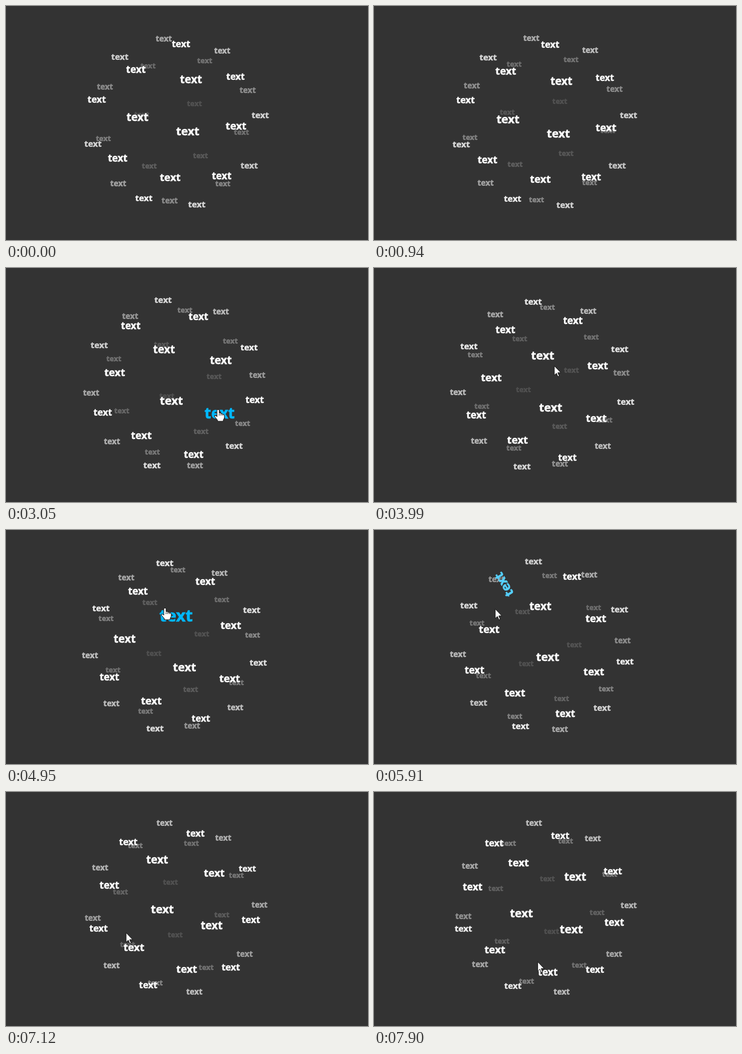
Animation of 633 by 409 pixels, one loop 8 s. Source, as an HTML page with a canvas:

```html
<!DOCTYPE html>
<html lang="en">
<head>
<meta charset="utf-8">
<title>Word sphere</title>
<style>
html, body { margin: 0; width: 633px; height: 409px; overflow: hidden; background: #333; }
canvas { display: block; }
</style>
</head>
<body>
<canvas width="633" height="409"></canvas>
<script>
const ctx = document.querySelector('canvas').getContext('2d');
const LOOP = 8, COUNT = 32, RADIUS = 150, DEPTH = 300, CX = 296, CY = 203.5;
const HOVER_TIME = .3, POINTER_IN = 2.3;

// time, pointer x, pointer y, sphere turned right, sphere turned down
const keys = [
  [0, 605, 376, 0, 0],
  [POINTER_IN, 605, 376, .1, .084],
  [2.85, 384, 258, .355, .232],
  [3.05, 371, 247, .413, .263],
  [4.1, 310, 165, .554, .342],
  [4.95, 278, 136, .57, .318],
  [5.4, 232, 98, .56, .262],
  [5.91, 212, 138, .515, .188],
  [7.12, 210, 246, .306, .082],
  [LOOP, 297, 303, .189, .142]
];

const hovers = [
  { word: 11, from: 2.74, to: 3.4 },
  { word: 4, from: 4.3, to: 5.12 },
  { word: 5, from: 5.35, to: 5.795 }
];

const arrow = new Path2D('M0 0V16.5L3.8 13 6.5 19 8.8 18 6.2 12H11.5Z');
const hand = new Path2D('M-2 1.5Q0-1 2 1.5V7Q5 5.5 5.5 8Q8 7 8.5 9Q11 8.5 11 11V15L9 19V21H-1V19L-6 13Q-7 10-4 11L-2 13Z');

const clamp = v => Math.min(1, Math.max(0, v));
const ease = v => { v = clamp(v); return v * v * (3 - 2 * v); };

// Smooth curve through the keys that never overshoots them.
function valueAt(t, col) {
  let i = 0;
  while (i < keys.length - 2 && t >= keys[i + 1][0]) i++;
  const grade = j => {
    j = Math.min(keys.length - 2, Math.max(0, j));
    return (keys[j + 1][col] - keys[j][col]) / (keys[j + 1][0] - keys[j][0]);
  };
  const slope = j => {
    const a = grade(j - 1), b = grade(j);
    return a * b > 0 ? 2 * a * b / (a + b) : 0;
  };
  const from = keys[i], to = keys[i + 1], dt = to[0] - from[0];
  const k = (t - from[0]) / dt;
  return from[col] + (to[col] - from[col]) * ease(k) +
    dt * k * (1 - k) * (slope(i) * (1 - k) - slope(i + 1) * k);
}

// Turns the front of the sphere right and down, then rolls the view.
function rotator(right, down, roll) {
  const angle = Math.hypot(right, down);
  const p = angle ? right / angle : 1, q = angle ? down / angle : 0;
  const c = Math.cos(angle), s = Math.sin(angle);
  const cr = Math.cos(roll), sr = Math.sin(roll);
  return ([x, y, z]) => {
    const along = x * p + y * q, across = y * p - x * q;
    const moved = along * c + z * s;
    const u = moved * p - across * q, v = moved * q + across * p;
    return [u * cr - v * sr, u * sr + v * cr, z * c - along * s];
  };
}

// Words lie evenly along a spiral from pole to pole.
const tilt = rotator(-1.131, -.063, 0);
const words = Array.from({ length: COUNT }, (_, i) => {
  const phi = Math.acos(1 - (2 * i + 1) / COUNT);
  const theta = Math.sqrt(COUNT * Math.PI) * phi + 1.09;
  const ring = RADIUS * Math.sin(phi);
  return tilt([ring * Math.sin(theta), ring * Math.cos(theta), RADIUS * Math.cos(phi)]);
});

function hoverOf(word, t) {
  const h = hovers.find(h => h.word === word);
  return h ? ease((t - h.from) / HOVER_TIME) * (1 - ease((t - h.to) / HOVER_TIME)) : 0;
}

function drawWord({ place: [x, y, z], hover }) {
  const near = DEPTH / (DEPTH - z);
  const size = Math.ceil(6 * near) + 8;
  const zoom = 1 + .45 * hover;
  ctx.save();
  ctx.translate(CX + x, CY + y);
  ctx.rotate(2 * Math.PI * hover);
  ctx.scale(zoom, zoom);
  ctx.globalAlpha = clamp((near - .6) / .6);
  ctx.fillStyle = ctx.strokeStyle = `rgb(${255 * (1 - hover)}, ${255 - 71 * hover}, 255)`;
  ctx.font = `700 ${size}px "Open Sans", "Noto Sans", sans-serif`;
  ctx.textAlign = 'center';
  ctx.lineWidth = .5;
  ctx.fillText('text', 0, size * .32);
  ctx.strokeText('text', 0, size * .32);
  ctx.restore();
}

function drawPointer(t) {
  if (t < POINTER_IN) return;
  const over = hovers.some(h => t >= h.from && t < h.to);
  const shape = over ? hand : arrow;
  ctx.save();
  ctx.translate(valueAt(t, 1), valueAt(t, 2));
  ctx.fillStyle = '#fff';
  ctx.strokeStyle = '#111';
  ctx.fill(shape);
  ctx.stroke(shape);
  if (over) {
    ctx.beginPath();
    for (let x = 2; x < 9; x += 3) {
      ctx.moveTo(x, 8);
      ctx.lineTo(x, 11);
    }
    ctx.stroke();
  }
  ctx.restore();
}

function draw(t) {
  const turn = rotator(valueAt(t, 3), valueAt(t, 4), .045 * ease(t - 4.95));
  ctx.fillStyle = '#333';
  ctx.fillRect(0, 0, 633, 409);
  words
    .map((word, i) => ({ place: turn(word), hover: hoverOf(i, t) }))
    .sort((a, b) => a.place[2] - b.place[2])
    .forEach(drawWord);
  drawPointer(t);
}

const start = performance.now();
function tick() {
  draw((performance.now() - start) / 1000 % LOOP);
  requestAnimationFrame(tick);
}
tick();
</script>
</body>
</html>
```
